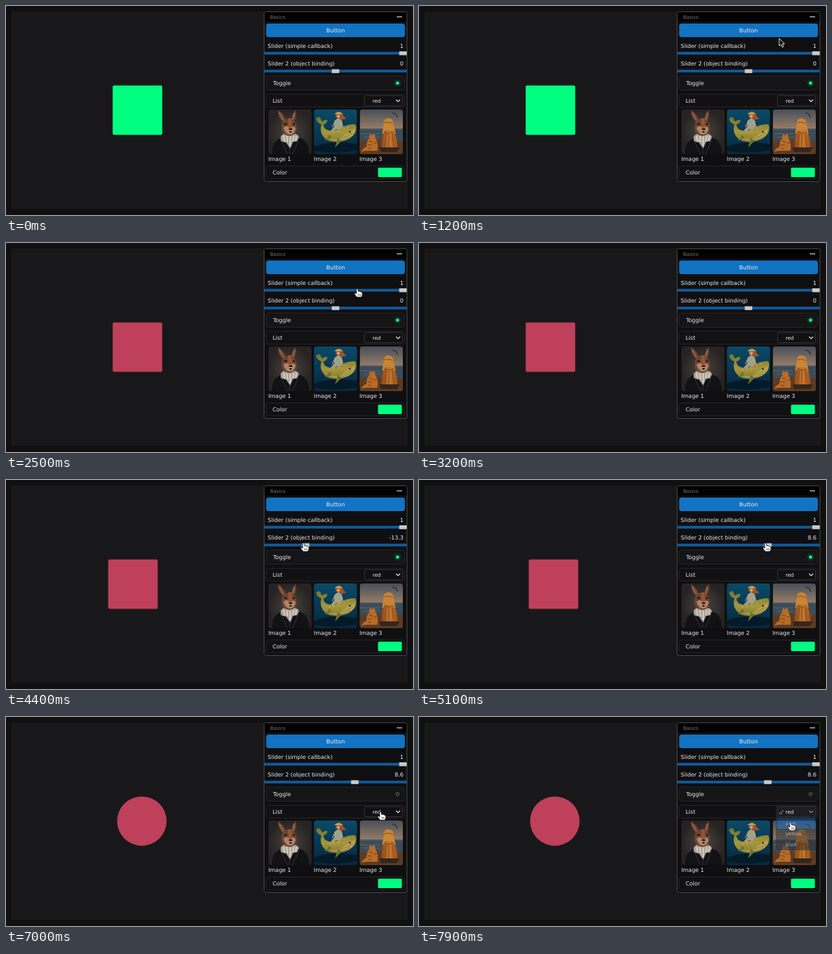
An HTML page that plays this animation: 600 px wide and 309 px high, repeating every 8000 ms.

```html
<!DOCTYPE html>
<html lang="en">
<head>
<meta charset="utf-8">
<title>GUI panel demo</title>
<style>
  html, body { margin: 0; width: 100%; height: 100%; overflow: hidden; background: #111011; }
  svg { display: block; }
  text { font: 8.22px "DejaVu Sans", Verdana, sans-serif; fill: #eee; text-rendering: geometricPrecision; }
  .small { font-size: 7.5px; }
  .end { text-anchor: end; }
  .row { fill: #111113; stroke: #252528; }
  .track { fill: #125a99; }
  .thumb { fill: #c9c9c9; }
  .line { fill: none; stroke: #eee; stroke-width: 1.1; }
</style>
</head>
<body>
<svg width="600" height="309" viewBox="0 0 600 309">
  <defs>
    <clipPath id="view"><rect x="8" y="8" width="584" height="292"/></clipPath>
    <clipPath id="card"><rect width="63.5" height="66" rx="4"/></clipPath>
    <radialGradient id="wall"><stop stop-color="#4a443f"/><stop offset="1" stop-color="#262322"/></radialGradient>
    <linearGradient id="deep" x2="0" y2="1"><stop stop-color="#094a68"/><stop offset="1" stop-color="#06283c"/></linearGradient>
    <linearGradient id="sky" x2="0" y2="1"><stop stop-color="#485059"/><stop offset=".42" stop-color="#937b66"/></linearGradient>
    <linearGradient id="coat" x2="1" y2="0"><stop stop-color="#8a4718"/><stop offset=".5" stop-color="#c67a2c"/><stop offset="1" stop-color="#98501c"/></linearGradient>
    <linearGradient id="whale" x2="0" y2="1"><stop stop-color="#71742e"/><stop offset=".6" stop-color="#a8963c"/><stop offset="1" stop-color="#807a32"/></linearGradient>
  </defs>
  <rect x="8" y="8" width="584" height="292" rx="2" fill="#18181a"/>
  <rect id="box" y="117.400" width="73" height="73"/>

  <rect x="380.5" y="8.5" width="210.5" height="251" rx="3" fill="#0f0f11" stroke="#48484a"/>
  <path d="M381 23V11q0-2 2-2h205.500q2 0 2 2v12z" fill="#020203"/>
  <text x="389.500" y="18.600" style="font-size:7.100px;fill:#777">Basics</text>
  <path class="line" d="M576 16h8"/>
  <rect id="button" x="383.500" y="26" width="204.500" height="20" rx="3.500"/>
  <text x="485.800" y="39.200" text-anchor="middle">Button</text>

  <text x="385.700" y="61.500">Slider (simple callback)</text>
  <text id="value1" class="end" x="586" y="61.500"></text>
  <rect class="track" x="381" y="67.800" width="210" height="4"/>
  <rect id="thumb1" class="thumb" y="67" width="11" height="5.700"/>
  <text x="385.700" y="88">Slider 2 (object binding)</text>
  <text id="value2" class="end" x="586" y="88"></text>
  <rect class="track" x="381" y="94.200" width="210" height="4"/>
  <rect id="thumb2" class="thumb" y="93.500" width="11" height="5.700"/>

  <rect id="toggle" class="row" x="383.500" y="103.500" width="204" height="21" rx="3"/>
  <text x="393.700" y="117">Toggle</text>
  <g id="on"><circle cx="577.200" cy="114" r="5" fill="#0c3a26"/><circle cx="577.200" cy="114" r="2.300" fill="#2bf594"/></g>
  <circle id="off" cx="577.200" cy="114" r="2.300" fill="none" stroke="#8a8a8a" stroke-width=".8"/>

  <rect class="row" x="383.500" y="130.500" width="204" height="19" rx="3"/>
  <text x="393" y="143">List</text>
  <rect class="row" x="528.500" y="132.500" width="56" height="15" rx="2" style="stroke:#343437"/>
  <text class="small" x="540.300" y="142.700">red</text>
  <path class="line" d="M575 138.500l3 3 3-3"/>

  <g transform="translate(387 153)" clip-path="url(#card)">
    <path d="M0 0h64v66H0z" fill="url(#wall)"/>
    <path d="M5 66q0-17 10-22l10-5h13l13 5q8 5 9 22z" fill="#121214"/>
    <path d="M18 40q4-5 9-4h10q6 0 8 5l-3 6-6 1-4 10-6-9-8-2z" fill="#aaa59c"/>
    <path d="M22 39l2 8M27 39l1 9M32 40v14M37 39l-1 8M41 39l-1 7" stroke="#dedbd2" stroke-width="1.500"/>
    <path d="M21 18Q13 10 14 1q8 5 11 13h9Q35 5 40 1q2 8-2 16 5 7 3 15-3 7-10 7-8 0-11-7-2-8 1-14z" fill="#6d4330"/>
    <path d="M16 5l6 11M38 5l-2 10" stroke="#a36a50" stroke-width="1.500"/>
    <path d="M22 27q3-3 7-2l3-10 2 10q5 0 6 3-2 9-8 9-7 0-10-10z" fill="#ad8468"/>
    <path d="M29 13h5l1 13q-3 3-6 0z" fill="#925338"/>
    <path d="M23 21.500h4M36 21.500h3M30 29h5M31 33h3" stroke="#140e0c" stroke-width="2"/>
    <path d="M19 46l9 20M44 46l-9 20M31 56v10" fill="none" stroke="#343334"/>
  </g>
  <g transform="translate(454 153)" clip-path="url(#card)">
    <path d="M0 0h64v66H0z" fill="url(#deep)"/>
    <path d="M0 55q25-10 64-4v9q-35 7-64 1z" fill="#051a28"/>
    <path d="M3 14q2-4 6-2l3 6q4-4 8-2-1 5-6 6 0 7 8 9 9 1 18-4 10-6 21-5 3 6-1 14-8 10-25 12-16 1-22-9-5-7-2-17-6-2-8-8z" fill="url(#whale)"/>
    <path d="M17 40q11 5 23 1l20-12q0 10-10 15-19 8-33-4z" fill="#bba554"/>
    <path d="M21 43q18 3 36-8M25 46q15 2 29-6" fill="none" stroke="#716a2e" stroke-width=".8"/>
    <path d="M35 42l-4 14 10-10zM23 37l-7 9 10-4z" fill="#6d742e"/>
    <path d="M23 35h1M29 34h1M36 32h1M44 28h1M50 26h1" stroke="#d4c573" stroke-width="1.300"/>
    <circle cx="53" cy="33" r="1.200" fill="#111"/>
    <path d="M30 17l6-5 5 4 2 8-5 6-5-1-6 4-2-2 5-6z" fill="#9fa18b"/>
    <path d="M32 12q-1-8 5-9 5 1 6 6l5 5-7 1-4-3z" fill="#a85025"/>
    <path d="M30 7q6-7 13 0z" fill="#c5a24c"/>
    <circle cx="36" cy="10" r="2.300" fill="#d6a17b"/>
    <path d="M31 18l-4 8M38 18l5 9" stroke="#cf9a74" stroke-width="1.300"/>
  </g>
  <g transform="translate(521.500 153)" clip-path="url(#card)">
    <path d="M0 0h64v66H0z" fill="url(#sky)"/>
    <path d="M0 28h64v20H0z" fill="#3b4c58"/>
    <path d="M0 29h64M0 36h30M6 41h24" stroke="#61676a"/>
    <path d="M0 47q32-4 64 0v19H0z" fill="#5d3b23"/>
    <path d="M48 5l5 2 3 5" fill="none" stroke="#20262b" stroke-width="1.300"/>
    <path d="M35 23q0-10 7-10 8 0 8 10l3 13H33z" fill="#c88537"/>
    <path d="M32 57q-1-21 6-26h10q7 5 8 26z" fill="url(#coat)"/>
    <path d="M36 20q6-3 13 1M37 33q6 4 12 0M43 34v22M39 36l-2 19M48 36l2 19" fill="none" stroke="#85451c"/>
    <path d="M29 56h30l-4 7H31z" fill="#33261f"/>
    <path d="M14 40l1-4 3 2 4-2 1 6q5 8 3 19H10q-5 0-7 2 0-5 7-8 0-9 4-12z" fill="#b86c28"/>
    <path d="M14 47l5 1M12 52l6 1M21 50l4-1M12 57l5 1" stroke="#6d381a"/>
  </g>
  <text x="386.700" y="228.500">Image 1</text>
  <text x="453.800" y="228.500">Image 2</text>
  <text x="521" y="228.500">Image 3</text>

  <rect class="row" x="383.500" y="236.500" width="204" height="19" rx="3"/>
  <text x="393" y="249">Color</text>
  <rect x="548.400" y="239" width="35.200" height="14" rx="1.500" fill="#00ff80"/>

  <g id="menu">
    <rect x="526" y="131" width="60" height="66" rx="3" fill="#2c2c2f"/>
    <rect id="pick" x="527.500" y="149.500" width="57" height="15.500" rx="2" fill="#1267c0"/>
    <path class="line" d="M531 141l2 2.500 4-6"/>
    <text class="small" x="540.300" y="142.700">red</text>
    <text class="small" x="540.300" y="159.500">pink</text>
    <text class="small" x="540.300" y="175.300">yellow</text>
    <text class="small" x="540.300" y="191">blue</text>
  </g>

  <g clip-path="url(#view)">
    <g id="cursor" stroke-linejoin="round">
      <path id="arrow" d="M0 0v11l2.600-2.400 1.900 4.300 2-.9-1.900-4.100H8z" fill="#000" stroke="#fff" stroke-width=".9"/>
      <g id="hand" stroke="#000" stroke-width=".8">
        <path d="M-1.200.8q1.200-1.500 2.400 0l.6 3.400 1.500-.4 1.200.8 1.400-.2.700 1.100 1.300.3v3.400l-1.400 3.300H-.4L-4 7.600q-.2-1.800 1.700-1.100l1.300 1z" fill="#fff"/>
        <path d="M1.700 7.800v2.700M3.500 7.800v2.700M5.200 7.800v2.700" stroke-width=".6"/>
      </g>
    </g>
  </g>
</svg>
<script>
const LOOP = 8000, LAG = 105;
const GREEN = [0, 255, 128], RED = [190, 64, 90];
// Pointer path: time, x, y
const PATH = [
  [100, 600, 262], [850, 538, 60], [1200, 531, 48], [1450, 520, 36], [1950, 519, 36],
  [2500, 517.5, 67.5], [2600, 517.5, 68], [2850, 460, 70], [3100, 600, 70], [3350, 604, 74],
  [3900, 482.5, 93.3], [4050, 482.5, 93.3], [4480, 434.2, 93.3], [4600, 434.2, 93.3],
  [5100, 510.9, 93.3], [5200, 510.9, 93.3], [5400, 511.5, 113], [5600, 512.5, 115],
  [6350, 512.5, 115], [6650, 540, 137], [6950, 552, 140], [7150, 552, 140],
  [7600, 546, 158], [7900, 547.5, 155.5]
];
const $ = id => document.getElementById(id);
const set = (id, attrs) => { for (const k in attrs) $(id).setAttribute(k, attrs[k]); };
const show = (id, visible) => set(id, { opacity: +visible });
const clamp = (v, lo = 0, hi = 1) => Math.min(hi, Math.max(lo, v));
const mix = (a, b, p) => a + (b - a) * p;
const ease = (t, from, to) => { const p = clamp((t - from) / (to - from)); return p * p * (3 - 2 * p); };

function pointer(t) {
  t = clamp(t, PATH[0][0], PATH.at(-1)[0]);
  const i = Math.max(1, PATH.findIndex(k => k[0] >= t));
  const a = PATH[i - 1], b = PATH[i], p = ease(t, a[0], b[0]);
  return [mix(a[1], b[1], p), mix(a[2], b[2], p)];
}
const fade = t => t < 2600 || t > 3100 ? 1 : clamp((pointer(t)[0] - 386.5) / 198.5);
const shift = t => (pointer(clamp(t, 4050, 5150))[0] - 482.5) / 3.3;

function draw(t) {
  const [x, y] = pointer(t), v1 = fade(t), v2 = shift(t);
  const within = (lo, hi) => y >= lo && y <= hi;
  const open = t > 7050, toggled = t >= 5800;
  const hand = within(26, 46) || within(66, 73) || within(91, 100) || within(103, 124)
    || within(132, 148) && x > 528 || open;

  const tint = ease(t, 1600, 1850);
  set('box', {
    x: 157.3 + 0.75 * shift(t - LAG),
    rx: mix(2, 36.5, ease(t, 5800, 6000)),
    fill: `rgb(${GREEN.map((c, i) => Math.round(mix(c, RED[i], tint)))})`,
    opacity: fade(t - LAG)
  });
  set('button', { fill: within(26, 46) ? '#0f65ae' : '#1273c3' });
  set('thumb1', { x: 381 + 198.7 * v1 });
  set('thumb2', { x: 480.3 + 3.3 * v2 });
  $('value1').textContent = +v1.toFixed(2);
  $('value2').textContent = +v2.toFixed(1);
  $('toggle').style.fill = within(103, 124) && x < 588 ? '#222225' : '#151517';
  show('on', !toggled);
  show('off', toggled);
  set('menu', { opacity: open ? clamp((8000 - t) / 200) : 0 });
  show('pick', y > 149);
  set('cursor', { transform: `translate(${x} ${y})` });
  show('hand', hand);
  show('arrow', !hand);
}
function tick() {
  draw(performance.now() % LOOP);
  requestAnimationFrame(tick);
}
tick();
</script>
</body>
</html>
```
